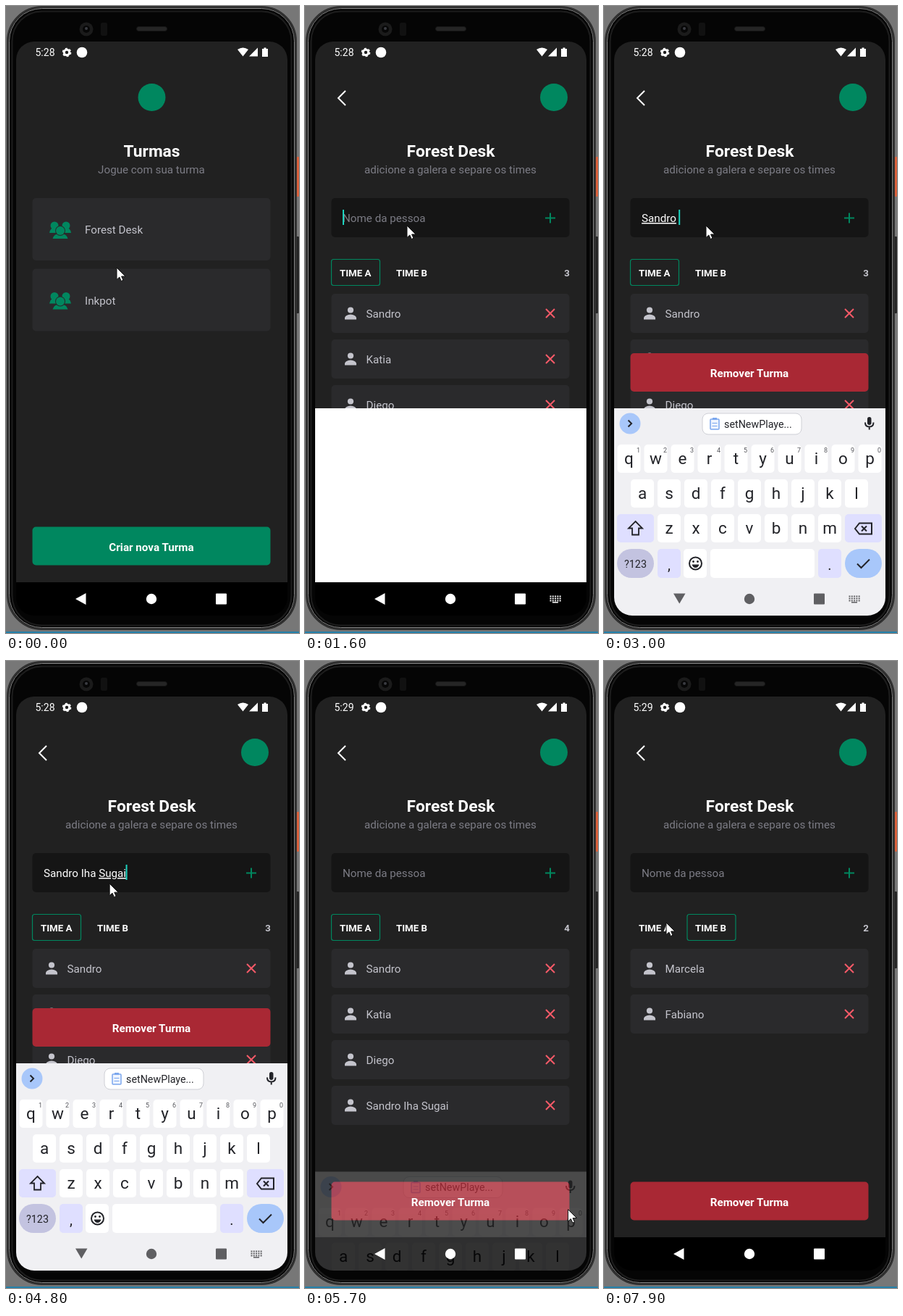
Recreate the animation shown at these times as an HTML page. Size 405 by 865 pixels, loop 8 s.

```html
<!DOCTYPE html>
<html lang="pt-BR">
<head>
<meta charset="utf-8">
<title>Turmas</title>
<style>
html, body { margin: 0; width: 100%; height: 100%; overflow: hidden; background: #777; }
svg { display: block; width: 405px; height: 865px; font-family: Roboto, Arial, sans-serif; }
text { white-space: pre; }
.b { font-weight: 700; }
.m { text-anchor: middle; }
.l { fill: none; stroke-width: 2; }
.u { text-decoration: underline; }
</style>
</head>
<body>
<svg id="stage" viewBox="0 0 405 865"></svg>
<script>
const LOOP = 8000, GREEN = '#00875f', RED = '#a92834', SOFT = '#c4c4cc', DIM = '#7c7c85';
const GROUP = 'Forest Desk', TYPED = 'Sandro Iha ';

const box = (x, y, w, h, fill, r = 5, more = '') =>
  `<rect x="${x}" y="${y}" width="${w}" height="${h}" rx="${r}" fill="${fill}" ${more}/>`;
const dot = (x, y, r, fill, more = '') => `<circle cx="${x}" cy="${y}" r="${r}" fill="${fill}" ${more}/>`;
const text = (x, y, s, size, fill, cls = '', more = '') =>
  `<text x="${x}" y="${y}" font-size="${size}" fill="${fill}" class="${cls}" ${more}>${s}</text>`;
const path = (d, fill, more = '') => `<path d="${d}" fill="${fill}" ${more}/>`;
const line = (d, color, more = '') => `<path class="l" d="${d}" stroke="${color}" ${more}/>`;
const group = (id, s, more = '') => `<g id="${id}" ${more}>${s}</g>`;

const button = (label, fill) => box(36.5, 718.5, 329, 53, fill) + text(201, 751.5, label, 15.2, '#fff', 'b m');
const heading = (title, sub) =>
  text(201.5, 208, title, 22.8, '#fff', 'b m') + text(201, 230.5, sub, 15.2, DIM, 'm');
const paper = box(14, 49, 375, 746, '#212121', 0);

// Screens
const crowd = y => `<g transform="translate(75 ${y})" fill="${GREEN}">
  <circle cx="-8" cy="-6" r="5.5"/><circle cx="8" cy="-6" r="5.5"/>
  <path d="M-15 4Q-14-3-8-3H8Q14-3 15 4Z"/>
  <path d="M-10.5 12Q-9 5 0 5T10.5 12Z" stroke="#2a2a2c" stroke-width="2" paint-order="stroke"/>
  <circle cy="1" r="6" stroke="#2a2a2c" stroke-width="2" paint-order="stroke"/></g>`;
const card = (y, name) => box(36.5, y, 329, 86, '#2a2a2c') + crowd(y + 44) +
  text(109, y + 49, name, 15.2, SOFT);
const home = paper + dot(201.5, 126, 19, GREEN) + heading('Turmas', 'Jogue com sua turma') +
  card(265, GROUP) + card(362.5, 'Inkpot') + button('Criar nova Turma', GREEN);

const row = (name, i) => group(name.includes(' ') ? 'added' : '',
  `${box(36.5, 0, 329, 54, '#2a2a2c')}${dot(63, 22.5, 4.1, SOFT)}
  ${path('M55 35.5v-2.5q1-4 8-4.5 7 .5 8 4.5v2.5z', SOFT)}${text(84.5, 33, name, 15.2, SOFT)}
  ${line('M333 21l12 12m0-12l-12 12', '#f75a68')}`, `transform="translate(0 ${397 + 63 * i})"`);
const team = paper + line('M56 117L46 127l10 10', '#fff') + dot(344, 126, 19, GREEN) +
  heading(GROUP, 'adicione a galera e separe os times') +
  box(36.5, 265, 329, 54, '#151515') +
  text(52, 298, 'Nome da pessoa', 15.2, DIM, '', 'id="hint"') +
  text(52, 298, '<tspan></tspan><tspan class="u"></tspan><tspan></tspan>', 15.2, '#fff', '', 'id="entry"') +
  box(52, 281, 2, 21, '#1cd3bf', 0, 'id="caret"') +
  line('M332 292.5h14m-7-7v14', GREEN) +
  box(36.5, 349.5, 67, 36, 'none', 3, `id="tab" stroke="${GREEN}" stroke-width="1.2"`) +
  text(48, 373, 'TIME A', 13.3, '#fff', 'b') + text(126, 373, 'TIME B', 13.3, '#fff', 'b') +
  text(366, 373, '3', 13.3, SOFT, 'b', 'id="count" text-anchor="end"') +
  group('teamA', ['Sandro', 'Katia', 'Diego', TYPED + 'Sugai'].map(row).join('')) +
  group('teamB', ['Marcela', 'Fabiano'].map(row).join('')) +
  group('remove', button('Remover Turma', RED));

// Keyboard
const INK = '#222328', LILAC = '#dfdfff', BLUE = '#a8c7fa';
const keyRow = (chars, x, y) => [...chars].map((c, i) => {
  const cx = x + 37 * i;
  return box(cx - 16, y, 32, 39, '#fff') + text(cx, y + 26.5, c, 22.5, INK, 'm') +
    (y < 610 ? text(cx + 13, y + 10.5, (i + 1) % 10, 9, '#55565c', 'm') : '');
}).join('');
const keyboard = box(14, 555, 375, 286, '#f0f0f3', 0) +
  dot(36, 576, 14.5, BLUE) + line('M33.5 571.5l4.5 4.5-4.5 4.5', INK) +
  box(136, 562, 137, 29, '#fff', 8, 'stroke="#cfd0d6"') +
  box(147, 570, 12, 14, '#eef4ff', 1, 'stroke="#7ba7ee" stroke-width="1.5"') +
  path('M150 568h6v3h-6zM149.500 575h7v1h-7zM149.500 579h7v1h-7z', '#7ba7ee') +
  text(166, 581.5, 'setNewPlaye...', 14.3, INK) +
  box(364, 567, 5.5, 11, INK, 2.7) + line('M361 574.500q0 6 5.750 6t5.750-6m-5.750 6v4', INK, 'stroke-width="1.5"') +
  group('letters', keyRow('qwertyuiop', 34.5, 605) + keyRow('asdfghjkl', 53, 653) + keyRow('zxcvbnm', 90, 701)) +
  box(18, 701, 51, 39, LILAC) + box(333, 701, 51, 39, LILAC) +
  path('M43.500 711l9.500 9.500h-5v9h-9v-9h-5z', 'none', `id="shift" stroke="${INK}" stroke-width="1.8"`) +
  line('M347 721l6-7.500h17v15h-17zm9-3.500l7 7m0-7l-7 7', INK, 'stroke-width="1.8"') +
  box(18, 749, 51, 40, '#c3c3e0', 20) + text(43.5, 775, '?123', 14.3, INK, 'm') +
  box(74, 749, 32, 40, LILAC) + text(90, 778, ',', 20, INK, 'm') +
  box(110, 749, 32, 40, '#fff') + dot(126.5, 769, 8.5, 'none', `stroke="${INK}" stroke-width="2"`) +
  dot(123.5, 766.5, 1.4, INK) + dot(129.5, 766.5, 1.4, INK) + path('M121.500 770.500h10q-1.500 4.500-5 4.500t-5-4.500z', INK) +
  box(147, 749, 144, 40, '#fff') +
  box(296, 749, 32, 40, LILAC) + text(312, 778, '.', 20, INK, 'm') +
  box(333, 749, 51, 40, BLUE, 20) + line('M350 769.500l5.500 5.500 11.500-11.500', INK);

// System bars and phone body
const gear = dot(84, 64, 3.7, 'none', 'stroke="#fff" stroke-width="3"') +
  dot(84, 64, 5.3, 'none', 'stroke="#fff" stroke-width="2" stroke-dasharray="2.8 2.75"');
const status = text(40.5, 69, '5:28', 14, '#fff', '', 'id="clock"') + gear + dot(105, 64, 7.3, '#fff') +
  path('M320 60q7.500-5 15 0l-7.500 9.500zM348 57.500v12h-12zM354 59h2.500v-1.500h3v1.500h2.500v11h-8z', '#fff');
const keyDots = [0, 1, 2].map(j => [0, 1, 2, 3, 4].map(i =>
  box(338.5 + i * 3.3, 813.5 + j * 3, 2, 1.9, 'currentColor', 0)).join('')).join('') +
  box(342, 822, 8, 1.5, 'currentColor', 0);
const nav = path('M96 818l14.500-8v16z', 'currentColor', 'id="back"') + dot(201, 818, 7.2, 'currentColor') +
  box(290, 810.5, 15, 15, 'currentColor', 1) + group('keyIcon', keyDots);
const body = box(0, 0, 405, 865, '#777', 0) + box(0, 863, 405, 2, '#247fa8', 0) +
  box(402, 208, 3, 55, '#d9603b', 1) + box(401, 318, 4, 106, '#252525', 1) +
  box(2.5, 1.5, 398, 858, '#050505', 47, 'stroke="#303030" stroke-width="3"') +
  box(4.5, 3.5, 394, 854, 'none', 45, 'stroke="#858585" stroke-width="1"') +
  box(8.5, 7.5, 386, 847, 'none', 41, 'stroke="#1d1d1d" stroke-width="2"') +
  dot(111, 32, 9.5, '#1b1b1b') + dot(111, 32, 5, '#070707') + dot(111, 31, 2, '#3a3c42') +
  box(131, 23, 9, 18, '#111', 2) + box(180.5, 28.5, 42, 6, '#252525', 3, 'stroke="#171717"');

const stage = document.getElementById('stage');
stage.innerHTML = `<defs><clipPath id="screen">${box(14, 49, 375, 792, '#000', 25)}</clipPath>
  <clipPath id="page">${box(14, 49, 375, 746, '#000', 0)}</clipPath></defs>${body}
  <g clip-path="url(#screen)">${box(14, 49, 375, 792, '#000', 0)}
    <g clip-path="url(#page)">${group('home', home)}${group('team', team)}</g>
    ${box(14, 555, 375, 240, '#fff', 0, 'id="blank"')}
    ${group('keyboard', keyboard)}${group('nav', nav)}${status}
  </g>${path('M0 0V16.500L3.800 13 6.300 18.500 9 17.300 6.600 12H12Z', '#fff', 'id="mouse" stroke="#111"')}`;
const el = Object.fromEntries([...stage.querySelectorAll('[id]')].map(e => [e.id, e]));

// Motion
const clamp = v => Math.min(1, Math.max(0, v));
const span = (t, a, b) => clamp((t - a) / (b - a));
const show = (e, on) => e.style.display = on ? '' : 'none';
const last = (list, t) => list.findLast(k => k[0] <= t);
const zoom = s => `translate(201.500 422) scale(${s}) translate(-201.500 -422)`;

// time, committed text, underlined text, trailing text
const typing = [
  [0, '', '', ''], [2300, '', 'S', ''], [2700, '', 'Sandr', ''], [2900, '', 'Sandro', ''],
  [3000, '', 'Sandro', ' '], [3200, 'Sandro ', 'I', ''], [3400, 'Sandro ', 'Ih', 'a'],
  [3600, 'Sandro ', 'Iha', ' '], [3900, TYPED, 'S', ''], [4100, TYPED, 'Su', ''],
  [4200, TYPED, 'Sug', ''], [4300, TYPED, 'Suga', 'i'], [4500, TYPED, 'Sugai', ''], [5400, '', '', '']
];
const moves = [
  [0, 153, 361], [100, 153, 361], [600, 163, 330], [950, 163, 330], [1400, 141, 303], [4700, 141, 303],
  [4800, 142, 305], [5000, 372, 730], [5200, 364, 757], [5700, 364, 757], [6000, 246, 643],
  [6400, 205, 490], [6600, 169, 420], [6900, 190, 384], [7100, 138, 374], [7500, 138, 374],
  [7900, 86, 361], [8000, 86, 361]
];

function pointer(t) {
  const i = moves.findLastIndex(k => k[0] <= t), [a, x, y] = moves[i], [b, u, v] = moves[i + 1];
  const p = (t - a) / (b - a);
  return `translate(${x + (u - x) * p} ${y + (v - y) * p})`;
}

function draw(t) {
  // Opening a group: both screens grow while the new one fades in
  const p = span(t, 700, 1020);
  el.home.setAttribute('transform', zoom(1 + .15 * (1 - (1 - p) ** 3)));
  el.team.setAttribute('transform', zoom(1 - .15 * (1 - p) ** 5));
  el.team.style.opacity = span(t, 780, 965);
  show(el.home, t < 965);

  // Keyboard
  const up = span(t, 1620, 1860), down = span(t, 5500, 5800);
  const alpha = up * clamp(1 - 1.2 * down);
  el.keyboard.setAttribute('transform', `translate(0 ${240 * (1 - up) ** 2 + 333 * down ** 2})`);
  el.keyboard.style.opacity = alpha;
  show(el.blank, t >= 1580 && t < 5500);
  el.letters.style.textTransform = t < 2380 ? 'uppercase' : 'none';
  el.shift.setAttribute('fill', t < 2380 ? INK : 'none');
  el.nav.style.color = alpha > .5 ? '#5f5f62' : '#fff';
  const focused = t >= 1580 && t < 5500;
  el.back.setAttribute('d', alpha > .5 ? 'M96 810.500h16.500l-8.250 14z' : 'M96 818l14.500-8v16z');
  show(el.keyIcon, focused);
  el.remove.setAttribute('transform', `translate(0 ${t > 1680 && t < 5500 ? -239.5 : 0})`);

  // Name entry
  const [since, ...parts] = last(typing, t);
  parts.forEach((s, i) => { el.entry.children[i].textContent = s; });
  const empty = !parts.join('');
  show(el.hint, empty);
  el.caret.setAttribute('x', empty ? 52 : 51.5 + el.entry.getComputedTextLength());
  const blink = (t - (since === 4500 ? 4350 : since || 1580)) % 1000 < 500;
  show(el.caret, focused && t < 5400 && blink);

  // Teams
  const isB = t >= 7400;
  show(el.teamA, !isB);
  show(el.teamB, isB);
  show(el.added, t >= 5400);
  el.tab.setAttribute('x', isB ? 115 : 36.5);
  el.count.textContent = isB ? 2 : t < 5400 ? 3 : 4;
  el.clock.textContent = t < 5500 ? '5:28' : '5:29';
  el.mouse.setAttribute('transform', pointer(t));
}

function tick() {
  draw(performance.now() % LOOP);
  requestAnimationFrame(tick);
}
tick();
</script>
</body>
</html>
```
